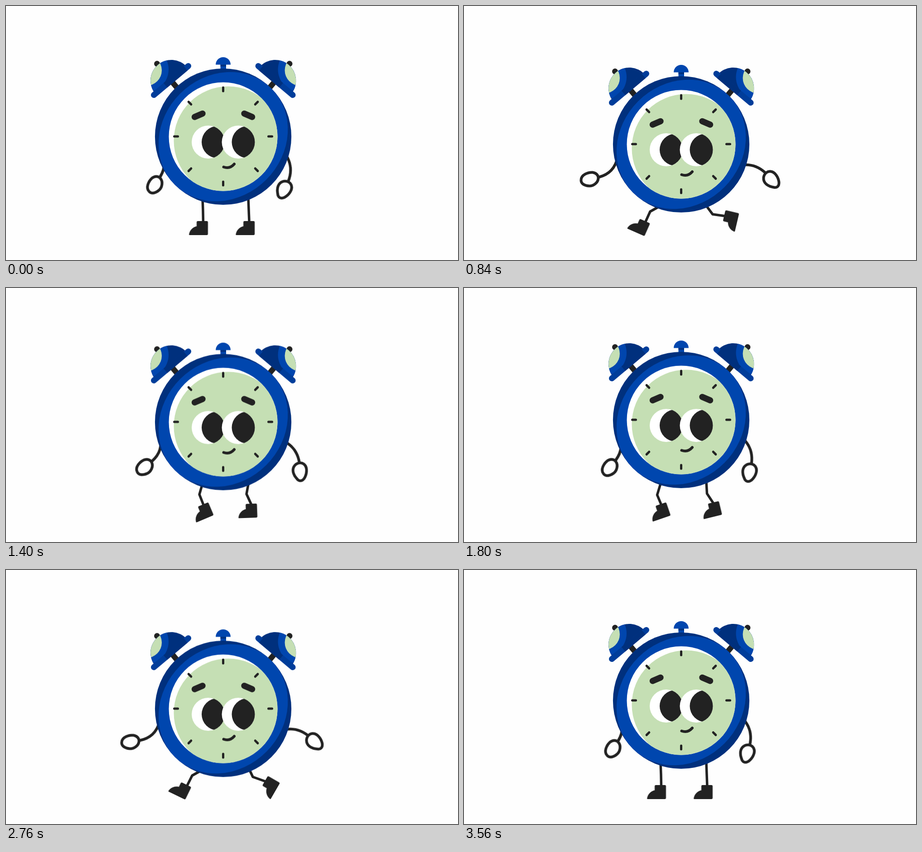
Recreate the animation shown at these times as an HTML page without scripts. Size 998 by 561 pixels, loop 3600 ms.

```html
<!DOCTYPE html>
<html lang="en">
<head>
<meta charset="utf-8">
<title>Bouncing alarm clock</title>
<style>
  html, body { margin: 0; width: 100%; height: 100%; overflow: hidden; background: #fefefe; }
  svg { display: block; width: 998px; height: 561px; }

  .ink { fill: #222; }
  .blue { fill: #0046ae; }
  .navy { fill: #00307d; }
  .mint { fill: #c5dfb4; }
  .white { fill: #fff; }
  .line { fill: none; stroke: #222; stroke-width: 6; stroke-linecap: round; stroke-linejoin: round; }
  .leg { stroke-width: 5.5; }
  .tick { stroke-width: 5; }
  .brow { stroke-width: 13.5; }
  .hand { fill: #fefefe; }

  .bob, .arm, .leg, .foot { animation: 3.6s linear infinite; }
  .bob { animation-name: bob; }
  .arm.left { animation-name: arm-left; transform-origin: 340px 316.5px; }
  .arm.right { animation-name: arm-right; transform-origin: 618.2px 338.5px; }
  .leg.left { animation-name: leg-left; }
  .leg.right { animation-name: leg-right; }
  .foot.left { animation-name: foot-left; }
  .foot.right { animation-name: foot-right; }

  @keyframes bob {
    0% { transform: translateY(0); }
    10% { transform: translateY(8.5px); }
    15.56% { transform: translateY(13.4px); }
    20.56% { transform: translateY(18.3px); }
    23.33% { transform: translateY(17px); }
    31.11% { transform: translateY(13px); }
    38.89% { transform: translateY(7.7px); }
    46.67% { transform: translateY(4px); }
    50% { transform: translateY(3px); }
    52.78% { transform: translateY(3.8px); }
    61.11% { transform: translateY(9.4px); }
    74.44% { transform: translateY(18.6px); }
    76.67% { transform: translateY(18.2px); }
    93.33% { transform: translateY(5px); }
    98.89%, 100% { transform: translateY(0); }
  }
  @keyframes arm-left {
    0% { transform: rotate(0deg); }
    10% { transform: rotate(23deg); }
    15.56% { transform: rotate(36.5deg); }
    20.56% { transform: rotate(48deg); }
    23.33% { transform: rotate(43.6deg); }
    31.11% { transform: rotate(32.5deg); }
    38.89% { transform: rotate(17.2deg); }
    46.67% { transform: rotate(8deg); }
    50% { transform: rotate(5deg); }
    52.78% { transform: rotate(7deg); }
    61.11% { transform: rotate(21.4deg); }
    74.44% { transform: rotate(48deg); }
    76.67% { transform: rotate(47.2deg); }
    93.33% { transform: rotate(14deg); }
    98.89%, 100% { transform: rotate(0deg); }
  }
  @keyframes arm-right {
    0% { transform: rotate(0deg); }
    10% { transform: rotate(-33.8deg); }
    15.56% { transform: rotate(-54deg); }
    20.56% { transform: rotate(-75deg); }
    23.33% { transform: rotate(-68.9deg); }
    31.11% { transform: rotate(-50deg); }
    38.89% { transform: rotate(-31.3deg); }
    46.67% { transform: rotate(-18deg); }
    50% { transform: rotate(-14deg); }
    52.78% { transform: rotate(-17deg); }
    61.11% { transform: rotate(-36.8deg); }
    74.44% { transform: rotate(-75.5deg); }
    76.67% { transform: rotate(-74.2deg); }
    93.33% { transform: rotate(-25deg); }
    98.89%, 100% { transform: rotate(-9.6deg); }
  }
  @keyframes leg-left {
    0%, 98.89%, 100% { d: path("M434 425L435 452L435.5 478"); }
    5% { d: path("M434 429L424 453L421 478"); }
    10% { d: path("M436 432L416 453L406 474"); }
    23.33% { d: path("M438 439L411 454L401 476"); }
    38.89% { d: path("M435 428L427 456L436 479"); }
    61.11% { d: path("M435 430L426 458L435 478"); }
    76.67% { d: path("M436 440L411 454L400 476"); }
  }
  @keyframes foot-left {
    0%, 98.89%, 100% { transform: translate(433.5px, 475px) rotate(0deg); }
    5% { transform: translate(420px, 475.5px) rotate(10deg); }
    10% { transform: translate(404px, 470.5px) rotate(20deg); }
    23.33% { transform: translate(399.5px, 475px) rotate(24deg); }
    38.89% { transform: translate(435px, 478px) rotate(-23deg); }
    61.11% { transform: translate(434px, 476.5px) rotate(-15deg); }
    76.67% { transform: translate(398px, 474px) rotate(26deg); }
  }
  @keyframes leg-right {
    0%, 98.89%, 100% { d: path("M535 425L536 452L537 478"); }
    5% { d: path("M536 429L542 450L553 471"); }
    10% { d: path("M536 425L547 444L570 459"); }
    23.33% { d: path("M534 440L549 460L577 464"); }
    38.89% { d: path("M536 428L531 455L542 479"); }
    61.11% { d: path("M534 428L542 453L560 473"); }
    76.67% { d: path("M537 440L545 457L573 467"); }
  }
  @keyframes foot-right {
    0%, 98.89%, 100% { transform: translate(536.5px, 475px) rotate(0deg); }
    5% { transform: translate(553px, 469px) rotate(-25deg); }
    10% { transform: translate(569px, 458.5px) rotate(-50deg); }
    23.33% { transform: translate(574.5px, 463px) rotate(-77deg); }
    38.89% { transform: translate(541.5px, 476.5px) rotate(-2deg); }
    61.11% { transform: translate(559.5px, 470.5px) rotate(-25deg); }
    76.67% { transform: translate(572px, 465.5px) rotate(-60deg); }
  }
</style>
</head>
<body>
<svg viewBox="0 0 998 561">
  <defs>
    <path id="dome" d="M329 193A45.8 45.8 0 0 1 399 134Z"/>
    <clipPath id="dome-clip"><use href="#dome"/></clipPath>
    <clipPath id="dial-clip"><circle cx="479.5" cy="288.5" r="120"/></clipPath>
    <clipPath id="eye-clip"><circle r="36.5"/></clipPath>

    <path id="boot" class="ink" d="M-10 0H10Q12.5 0 12.5 3V28Q12.5 31 10 31H-28Q-30 31-29 28C-27 19-20 13-12.5 11.5V3Q-12.5 0-10 0Z"/>
    <path id="ticks" class="line tick" d="M0-108V-100M0 100V108M-108 0H-100M100 0H108"/>

    <g id="eye">
      <circle class="white" r="36.5"/>
      <circle class="ink" cx="21" r="35.5" clip-path="url(#eye-clip)"/>
    </g>

    <g id="bell">
      <path d="M362 162L384 188" stroke="#222" stroke-width="12"/>
      <circle class="ink" cx="333.5" cy="127.5" r="6.5"/>
      <use href="#dome" class="navy"/>
      <g clip-path="url(#dome-clip)">
        <circle class="blue" cx="309" cy="140" r="50"/>
        <circle class="mint" cx="310" cy="142" r="34"/>
      </g>
      <path d="M326.5 196.5L402.5 132.5" stroke="#003d9a" stroke-width="13" stroke-linecap="round"/>
      <path d="M352 175L396.5 137.5" stroke="#00307d" stroke-width="13"/>
    </g>
  </defs>

  <path class="line leg left" d="M434 425L435 452L435.5 478"/>
  <path class="line leg right" d="M535 425L536 452L537 478"/>
  <g class="foot left"><use href="#boot"/></g>
  <g class="foot right"><use href="#boot"/></g>

  <g class="bob">
    <g class="arm left">
      <g transform="rotate(-43.6 340 316.5)">
        <path class="line" d="M340 315C334 342 320 355 298 361"/>
        <path class="line hand" d="M258.5 366.5C259 356 273 350 284 350.5C292 351.5 296.5 357 296.5 363C296 374 285 380.5 277 380.5C267 380 257.5 376 258.5 366.5Z"/>
      </g>
    </g>
    <g class="arm right">
      <g transform="rotate(68.9 618.2 338.5)">
        <path class="line" d="M616 334C636 332 652 339 665 351"/>
        <path class="line hand" d="M661.5 362C663 352 671 347 678 348.5C687 350 694 361 695.5 372C696 381 691 385 684.5 383.5C671 381.500 660.5 374 661.5 362Z"/>
      </g>
    </g>

    <use href="#bell"/>
    <use href="#bell" transform="translate(959.5) scale(-1 1)"/>

    <path class="blue" d="M473.5 129H486V145H473.5Z"/>
    <path class="navy" d="M473.5 129H486V133.5H473.5Z"/>
    <path class="blue" d="M463 129.5A16.5 16.5 0 0 1 496 129.5Z"/>

    <circle class="navy" cx="479.5" cy="288.5" r="150.6"/>
    <ellipse class="blue" rx="150.6" ry="134.5" transform="translate(479.5 288.5) rotate(-45)"/>
    <circle class="white" cx="479.5" cy="288.5" r="120"/>
    <g clip-path="url(#dial-clip)"><circle class="mint" cx="490.5" cy="297.5" r="120"/></g>

    <g transform="translate(479.5 288)">
      <use href="#ticks"/>
      <use href="#ticks" transform="rotate(45)"/>
    </g>

    <path class="line brow" d="M416.5 245L434 237.5M526 237.5L543.5 245"/>
    <use href="#eye" x="446.5" y="300.5"/>
    <use href="#eye" x="513" y="300.5"/>
    <path class="line" d="M480.5 355.5Q494 360.5 504 349"/>
  </g>
</svg>
</body>
</html>
```
